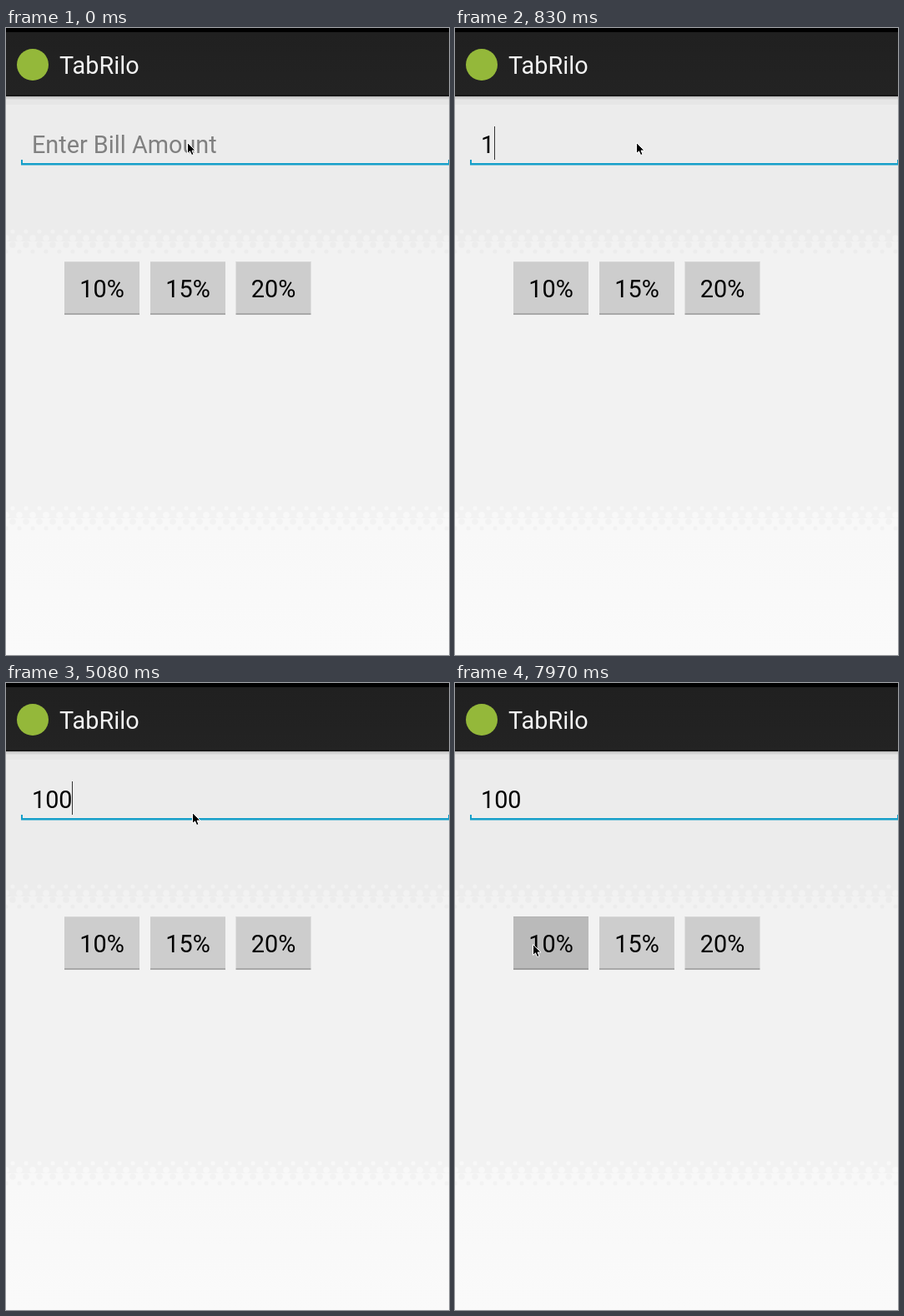
Animation of 531 by 752 pixels, one loop 8 s. Source, as an HTML page with a canvas:

```html
<!DOCTYPE html>
<html lang="en">
<head>
<meta charset="utf-8">
<title>Tip calculator</title>
<style>
html, body { margin: 0; width: 100%; height: 100%; overflow: hidden; background: #000; }
canvas { display: block; }
</style>
</head>
<body>
<canvas id="stage" width="531" height="752"></canvas>
<script>
const W = 531, H = 752, LOOP = 8000;
const ctx = document.getElementById('stage').getContext('2d');

// Each track lists [start time in ms, value].
const POINTER = [
  [0, [217, 137]], [5080, [223, 155]], [5210, [189, 219]],
  [5350, [156, 258]], [5500, [103, 306]], [5650, [93, 313]]
];
const TYPED = [[0, ''], [830, '1'], [2240, '10'], [4060, '100']];
const CARET_TOGGLES = [830, 2830, 3260, 3790, 4060, 4490, 5080, 5500, 6120, 6560, 7110, 7540];
const BLACKOUT = [500, 670];
const PRESS_AT = 7970;
const BUTTONS = [[70, '10%'], [173, '15%'], [275.5, '20%']];

const valueAt = (track, t) => track.filter(([start]) => start <= t).pop()[1];

function rect(x, y, w, h, color) {
  ctx.fillStyle = color;
  ctx.fillRect(x, y, w, h);
}

function text(str, x, baseline, color, align = 'left') {
  ctx.font = '28.8px Roboto, sans-serif';
  ctx.textAlign = align;
  ctx.fillStyle = color;
  ctx.fillText(str, x, baseline);
}

function verticalGradient(y, h, from, to) {
  const g = ctx.createLinearGradient(0, y, 0, y + h);
  g.addColorStop(0, from);
  g.addColorStop(1, to);
  rect(0, y, W, h, g);
}

// Halftone band between two flat greys.
function halftone(y, above, below) {
  rect(0, y, W, 16, above);
  rect(0, y + 16, W, 16, below);
  for (let row = 0; row < 4; row++) {
    ctx.fillStyle = row < 2 ? below : above;
    const radius = row === 0 || row === 3 ? 2.6 : 3.8;
    for (let x = row % 2 ? 0 : 8; x < W + 8; x += 16) {
      ctx.beginPath();
      ctx.arc(x, y + 4 + row * 8, radius, 0, Math.PI * 2);
      ctx.fill();
    }
  }
}

function drawBackground() {
  rect(0, 82, W, 160, '#ececec');
  rect(0, 272, W, 300, '#f2f2f2');
  verticalGradient(604, H - 604, '#f8f8f8', '#fafafa');
  halftone(240, '#ececec', '#f2f2f2');
  halftone(572, '#f2f2f2', '#f8f8f8');
  rect(0, 82, W, 10, '#e6e6e6');
  verticalGradient(82, 4, '#bdbdbd', '#e4e4e4');
}

function drawTitleBar() {
  rect(0, 0, W, 5, '#000');
  verticalGradient(5, 77, '#202020', '#232323');
  rect(0, 80, W, 2, '#181818');
  ctx.fillStyle = '#94b83a';
  ctx.beginPath();
  ctx.arc(32, 44, 19, 0, Math.PI * 2);
  ctx.fill();
  text('TabRilo', 64, 55, '#f3f3f3');
}

function drawField(t) {
  const typed = valueAt(TYPED, t);
  if (typed) text(typed, 31, 150, '#000');
  else text('Enter Bill Amount', 31, 150, '#808080');

  const line = '#159fc9';
  rect(18, 162, W - 18, 2.5, line);
  rect(18, 158, 2, 6, line);
  rect(530, 158, 1, 6, line);

  const caretOn = CARET_TOGGLES.filter(at => at <= t).length % 2 === 1;
  if (caretOn) rect(31 + typed.length * 16, 118, 1, 40, '#333');
}

function drawButton(x, label, pressed) {
  rect(x, 280, 90, 62, pressed ? '#bababa' : '#cdcdcd');
  rect(x, 280, 90, 1, pressed ? '#b2b2b2' : '#d6d6d6');
  rect(x, 342, 90, 2, pressed ? '#9c9c9c' : '#a8a8a8');
  text(label, x + 45, 323, '#000', 'center');
}

function drawPointer([x, y]) {
  ctx.save();
  ctx.translate(x, y);
  const arrow = new Path2D('M.5.5V13.5L3.5 10.8 5.6 15.5 8 14.6 6 10H10Z');
  ctx.fillStyle = '#000';
  ctx.strokeStyle = '#fff';
  ctx.lineWidth = 1;
  ctx.fill(arrow);
  ctx.stroke(arrow);
  ctx.restore();
}

function draw(t) {
  if (t >= BLACKOUT[0] && t < BLACKOUT[1]) {
    rect(0, 0, W, H, '#000');
  } else {
    drawBackground();
    drawTitleBar();
    drawField(t);
    BUTTONS.forEach(([x, label], i) => drawButton(x, label, i === 0 && t >= PRESS_AT));
  }
  drawPointer(valueAt(POINTER, t));
}

const began = performance.now();
function tick() {
  draw((performance.now() - began) % LOOP);
  requestAnimationFrame(tick);
}
tick();
</script>
</body>
</html>
```
